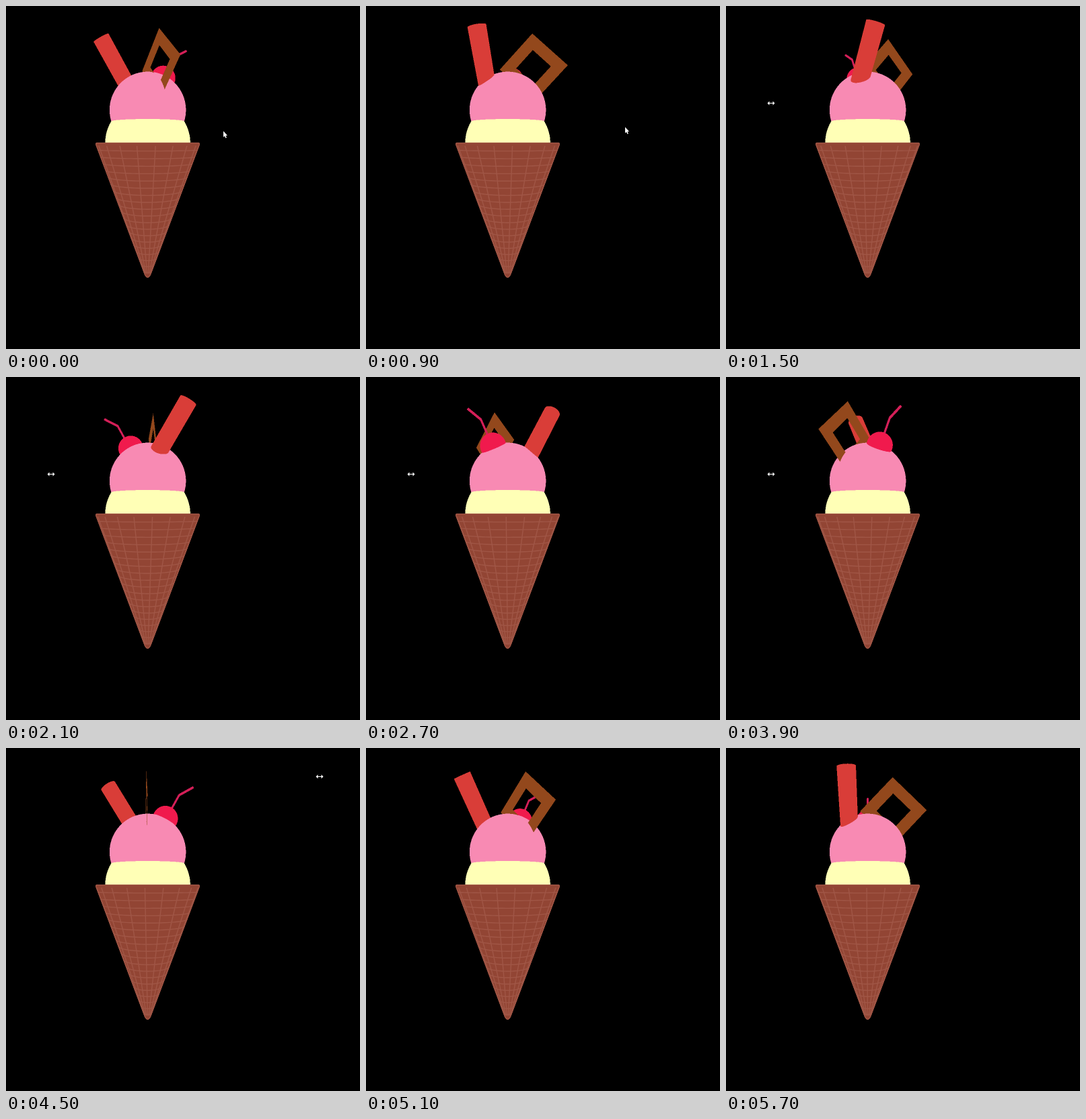
Recreate the animation shown at these times as an HTML page with a canvas. Size 526 by 510 pixels, loop 5.8 s.

```html
<!DOCTYPE html>
<html lang="en">
<head>
<meta charset="utf-8">
<title>Ice cream</title>
<style>
  html, body { margin: 0; width: 100%; height: 100%; overflow: hidden; background: #000; }
  canvas { display: block; }
</style>
</head>
<body>
<canvas id="stage" width="526" height="510"></canvas>
<script>
const ctx = document.getElementById('stage').getContext('2d');
const LOOP = 5800, STEP = 100;
const AXIS = 210.6, EYE = 204, DIST = 520;      // rotation axis, eye level, camera distance
const BOX = { x: 124, y: 14, w: 182, h: 190 };  // area that is ray cast
const RAD = Math.PI / 180;

const PINK = [248, 138, 179], CREAM = [255, 255, 182], RED = [217, 61, 56];
const CHERRY = [240, 26, 77], STEM = [212, 31, 88], WAFER = [147, 72, 28];

// step, degrees
const TURN = [[0, -87.5], [6, -63], [9, -36.5], [21, 53.5], [32, 141.5], [39, 197], [45, 244.3], [57, 336]];

// step, x, y, shape
const POINTER = [
  [0, 323, 186, 'arrow'], [7, 350, 184, 'arrow'], [8, 385, 180, 'arrow'],
  [15, 67, 144.5, 'resize'], [41, 0, 0, ''], [43, 93, 128, 'resize'],
  [44, 466, 42.5, 'resize'], [47, 0, 0, '']
];

function turnAt(step) {
  let i = 1;
  while (TURN[i][0] < step) i++;
  const [s0, a0] = TURN[i - 1], [s1, a1] = TURN[i];
  return a0 + (a1 - a0) * (step - s0) / (s1 - s0);
}

// point given by radial distance, height and sideways offset, turned about the axis
function place(radial, height, side, deg) {
  const s = Math.sin(deg * RAD), c = Math.cos(deg * RAD);
  return [radial * s + side * c, height, radial * c - side * s];
}

// Rays run from (0, 0, DIST) along (X, Y, -DIST); each shape returns the nearest hit.
function ball(c, r, color) {
  const oz = DIST - c[2];
  const k = c[0] * c[0] + c[1] * c[1] + oz * oz - r * r;
  return {
    color,
    hit(X, Y) {
      const a = X * X + Y * Y + DIST * DIST;
      const b = X * c[0] + Y * c[1] + DIST * oz;
      const d = b * b - a * k;
      return d < 0 ? Infinity : (b - Math.sqrt(d)) / a;
    }
  };
}

function rod(p, q, r, color) {
  const v = [q[0] - p[0], q[1] - p[1], q[2] - p[2]];
  const len = Math.hypot(...v);
  const [ax, ay, az] = v.map(n => n / len);
  const ox = -p[0], oy = -p[1], oz = DIST - p[2];
  const oa = ox * ax + oy * ay + oz * az;
  const px = ox - oa * ax, py = oy - oa * ay, pz = oz - oa * az;
  const k = px * px + py * py + pz * pz - r * r;
  return {
    color,
    hit(X, Y) {
      const da = X * ax + Y * ay - DIST * az;
      const dx = X - da * ax, dy = Y - da * ay, dz = -DIST - da * az;
      const a = dx * dx + dy * dy + dz * dz;
      const b = dx * px + dy * py + dz * pz;
      const d = b * b - a * k;
      if (d < 0) return Infinity;
      const root = Math.sqrt(d);
      const e0 = -oa / da, e1 = (len - oa) / da;
      const near = Math.max((-b - root) / a, Math.min(e0, e1));
      const far = Math.min((-b + root) / a, Math.max(e0, e1));
      return near < far ? near : Infinity;
    }
  };
}

// flat square frame standing on its corner, in an upright plane
function frame(deg, offset, color) {
  const s = Math.sin(deg * RAD), c = Math.cos(deg * RAD);
  return {
    color,
    hit(X, Y) {
      const t = (offset + DIST * s) / (X * c + DIST * s);
      if (!(t > 0)) return Infinity;
      const u = t * X * s + DIST * (1 - t) * c - 38.3;
      const v = t * Y - 110.7;
      const m = Math.abs(u + 0.03 * v) + Math.abs(v - 0.03 * u);
      return m < 49.7 && m > 25.5 ? t : Infinity;
    }
  };
}

function drawTop(deg) {
  const stalk = deg + 204;
  const joint = place(46.5, 133.5, 0, stalk);
  const shapes = [
    ball([0, 48.8, 0], 56.4, PINK),
    ball([0, 0, 0], 62.8, CREAM),
    rod(place(23, 75, -18.3, deg), place(69, 156, 0, deg), 12.6, RED),
    frame(deg + 117.5, -3, WAFER),
    ball(place(26, 98.7, 0, stalk), 18.7, CHERRY),
    rod(place(34, 111, 0, stalk), joint, 1.5, STEM),
    rod(joint, place(67.5, 145, 0, stalk), 1.7, STEM)
  ];
  const img = ctx.createImageData(BOX.w, BOX.h);
  let n = 0;
  for (let y = 0; y < BOX.h; y++) {
    for (let x = 0; x < BOX.w; x++, n += 4) {
      let r = 0, g = 0, b = 0;
      for (let k = 0; k < 4; k++) {
        const X = BOX.x + x + 0.25 + (k & 1) * 0.5 - AXIS;
        const Y = EYE - (BOX.y + y + 0.25 + (k >> 1) * 0.5);
        let best = Infinity, color = null;
        for (const shape of shapes) {
          const t = shape.hit(X, Y);
          if (t < best) { best = t; color = shape.color; }
        }
        if (color) { r += color[0]; g += color[1]; b += color[2]; }
      }
      img.data[n] = r / 4;
      img.data[n + 1] = g / 4;
      img.data[n + 2] = b / 4;
      img.data[n + 3] = 255;
    }
  }
  ctx.putImageData(img, BOX.x, BOX.y);
}

// point on the cone's surface at a depth below the rim
function conePoint(depth, deg) {
  const r = 77 * (1 - depth / 207);
  const s = DIST / (DIST - r * Math.cos(deg * RAD));
  return [AXIS + r * Math.sin(deg * RAD) * s, EYE + depth * s];
}

function drawCone(deg) {
  ctx.save();
  ctx.beginPath();
  ctx.moveTo(135, 203);
  ctx.lineTo(286, 203);
  ctx.quadraticCurveTo(289, 203.5, 287.6, 207);
  ctx.lineTo(215, 400);
  ctx.quadraticCurveTo(210.5, 408, 206, 400);
  ctx.lineTo(133.4, 207);
  ctx.quadraticCurveTo(132, 203.5, 135, 203);
  ctx.closePath();
  ctx.fillStyle = '#924534';
  ctx.fill();
  ctx.clip();

  ctx.strokeStyle = '#a05646';
  ctx.lineWidth = 2.4;
  ctx.stroke();

  ctx.lineWidth = 1.4;
  ctx.beginPath();
  for (let depth = 10; depth < 196; depth += 10) {
    for (let a = -82; a <= 82; a += 4) {
      const p = conePoint(depth, a);
      a === -82 ? ctx.moveTo(...p) : ctx.lineTo(...p);
    }
  }
  const phase = deg + 95;
  for (let i = 0; i < 20; i++) {
    const a = phase + i * 18;
    if (Math.cos(a * RAD) < 0.14) continue;
    ctx.moveTo(...conePoint(3.5, a));
    ctx.lineTo(...conePoint(192, a));
  }
  ctx.stroke();
  ctx.restore();
}

function polygon(x, y, pts) {
  ctx.beginPath();
  for (let i = 0; i < pts.length; i += 2) ctx.lineTo(x + pts[i], y + pts[i + 1]);
  ctx.closePath();
  ctx.fill();
}

function drawPointer(step) {
  const [, x, y, shape] = POINTER.filter(p => p[0] <= step).pop();
  ctx.fillStyle = '#fff';
  if (shape === 'arrow') {
    polygon(x, y, [0, 0, 0, 9, 2, 7.3, 3.4, 10.4, 4.8, 9.8, 3.5, 6.8, 6, 6.5]);
  } else if (shape === 'resize') {
    polygon(x, y, [-5.5, 0, -2.5, -3, -2.5, -0.6, 2.5, -0.6, 2.5, -3,
                   5.5, 0, 2.5, 3, 2.5, 0.6, -2.5, 0.6, -2.5, 3]);
  }
}

let shown = -1;
const start = performance.now();

function tick() {
  const step = Math.floor(((performance.now() - start) % LOOP) / STEP);
  if (step !== shown) {
    shown = step;
    const deg = turnAt(step);
    ctx.fillStyle = '#000';
    ctx.fillRect(0, 0, 526, 510);
    drawTop(deg);
    drawCone(deg);
    drawPointer(step);
  }
  requestAnimationFrame(tick);
}
tick();
</script>
</body>
</html>
```
